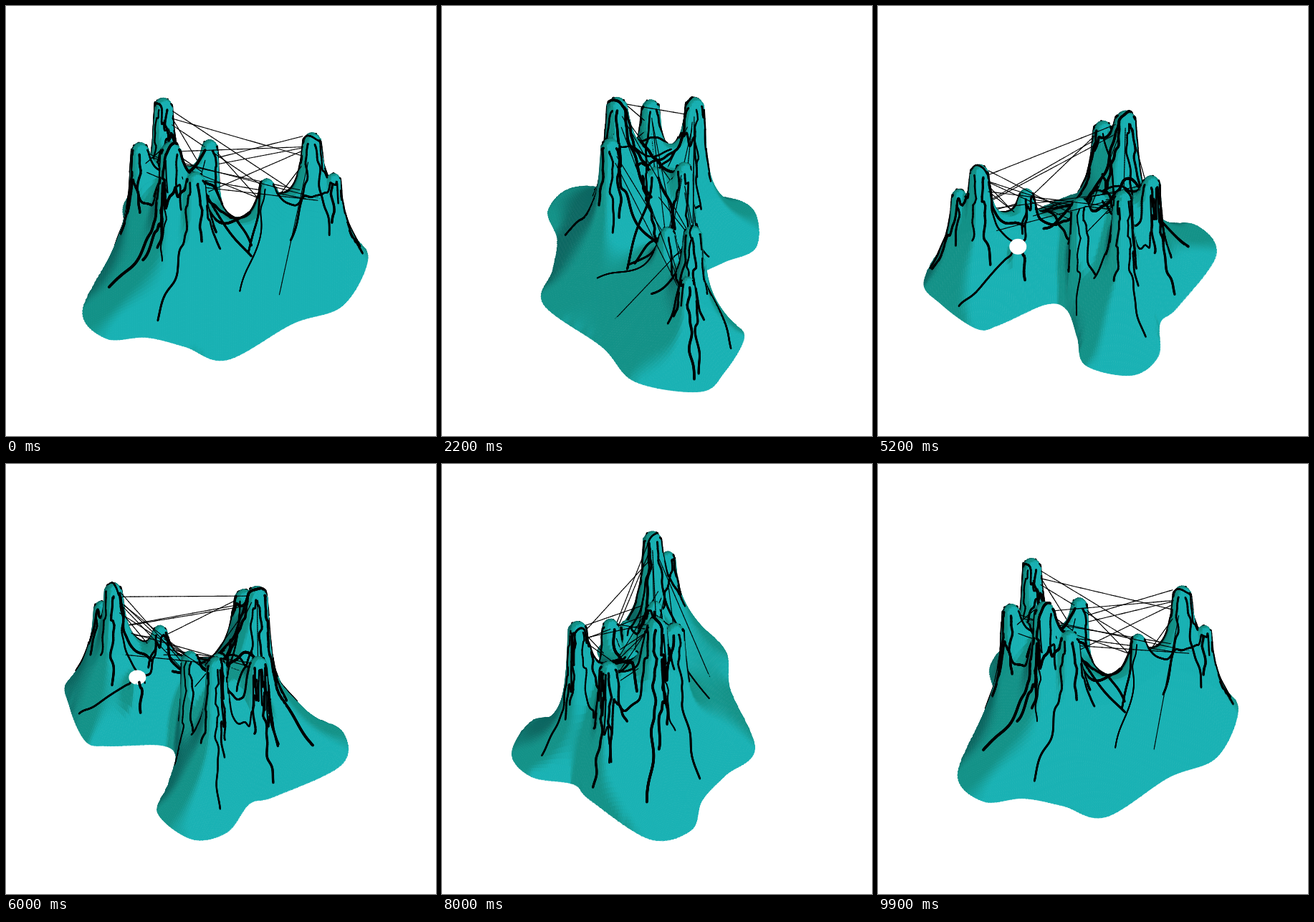
An HTML page with a canvas for the animation above (10000 ms loop, 600 by 600 pixels).

```html
<!DOCTYPE html>
<html lang="en">
<head>
<meta charset="utf-8">
<title>Rotating surface</title>
<style>
html, body { margin: 0; width: 100%; height: 100%; overflow: hidden; background: #fff; }
canvas { display: block; width: 600px; height: 600px; }
</style>
</head>
<body>
<canvas id="stage" width="600" height="600"></canvas>
<script>
const ctx = document.getElementById('stage').getContext('2d');
const CX = 286, CY = 378, TILT = 0.767, RISE = 0.643, STEP = 3;
const X0 = -192, Y0 = -186, NX = 142, NY = 118;
const TOP = 210, SKIRT = 0.52;

// Key points of the base outline, in plan
const rim = [
  [219,-34], [184,52], [114,85], [22,151], [-36,127], [-90,110], [-146,112], [-179,62],
  [-137,-39], [-117,-70], [-122,-130], [-90,-169], [-24,-159], [-6,-110], [15,-62],
  [45,-56], [105,-101], [135,-112], [190,-74]
];
// Summits: x, y, height
const peaks = [
  [-67,-80,184], [-99,-24,165], [-56,32,208], [-2,-53,147], [-22,48,179],
  [78,-14,123], [141,-38,168], [171,-25,122], [-23,-16,130], [84,-58,82]
];
const hole = [84, -59, 79];
const radius = h => 6.5 + h / 25;

let seed = 11;
function random() {
  seed = (seed * 16807) % 2147483647;
  return seed / 2147483647;
}

function smoothLoop(p, n) {
  const out = [];
  for (let i = 0; i < p.length; i++) {
    const [a, b, c, d] = [-1, 0, 1, 2].map(k => p[(i + k + p.length) % p.length]);
    for (let s = 0; s < n; s++) {
      const t = s / n;
      out.push([0, 1].map(k => b[k] + 0.5 * t * (c[k] - a[k] +
        t * (2 * a[k] - 5 * b[k] + 4 * c[k] - d[k] + t * (3 * (b[k] - c[k]) + d[k] - a[k])))));
    }
  }
  return out;
}

const edge = smoothLoop(rim, 14);
const area = new Path2D();
edge.forEach(([x, y]) => area.lineTo(x, y));
area.closePath();

// Gentle skirt below, steep columns above
const lift = u => TOP * (SKIRT * u + (1 - SKIRT) * u ** 8);
function unlift(h) {
  let a = 0, b = 1;
  for (let n = 0; n < 24; n++) {
    const m = (a + b) / 2;
    if (lift(m) < h) a = m; else b = m;
  }
  return a;
}

// Membrane stretched from the rim over the peaks
const inside = [], field = new Float64Array(NX * NY), free = [];
for (let k = 0; k < field.length; k++) {
  const x = X0 + (k % NX) * STEP, y = Y0 + Math.floor(k / NX) * STEP;
  inside[k] = ctx.isPointInPath(area, x, y);
  if (!inside[k]) continue;
  let h = 0;
  for (const [px, py, ph] of peaks) {
    const d = Math.hypot(x - px, y - py) / radius(ph);
    if (d <= 1) h = Math.max(h, ph - 9 * d ** 3);
  }
  if (h) field[k] = unlift(h);
  else free.push(k);
}
for (let n = 0; n < 350; n++) for (const k of free) {
  const mean = (field[k - 1] + field[k + 1] + field[k - NX] + field[k + NX]) / 4;
  field[k] += 1.85 * (mean - field[k]);
}
const nodes = Array.from(field, (u, k) => {
  let x = X0 + (k % NX) * STEP, y = Y0 + Math.floor(k / NX) * STEP;
  field[k] = lift(Math.max(0, u));
  if (!inside[k]) {
    let best = 1e9, near;
    for (const e of edge) {
      const d = (e[0] - x) ** 2 + (e[1] - y) ** 2;
      if (d < best) { best = d; near = e; }
    }
    [x, y] = near;
  }
  return [x, y, field[k]];
});

function heightAt(x, y) {
  const u = (x - X0) / STEP, v = (y - Y0) / STEP;
  const i = Math.floor(u), j = Math.floor(v), a = u - i, b = v - j, k = j * NX + i;
  return (field[k] * (1 - a) + field[k + 1] * a) * (1 - b) +
    (field[k + NX] * (1 - a) + field[k + NX + 1] * a) * b;
}

// Quads with averaged normals
const cells = new Map();
for (let j = 0; j < NY - 1; j++) for (let i = 0; i < NX - 1; i++) {
  const k = j * NX + i, q = [k, k + 1, k + NX + 1, k + NX];
  if (!q.some(c => inside[c])) continue;
  const [a, b, c, d] = q.map(n => nodes[n]);
  const e = [c[0] - a[0], c[1] - a[1], (c[2] - a[2]) / RISE];
  const f = [d[0] - b[0], d[1] - b[1], (d[2] - b[2]) / RISE];
  cells.set(k, { q, raw: [e[1] * f[2] - e[2] * f[1], e[2] * f[0] - e[0] * f[2], e[0] * f[1] - e[1] * f[0]] });
}
for (const [k, cell] of cells) {
  const n = [0, 0, 0];
  for (const dy of [-NX, 0, NX]) for (const dx of [-1, 0, 1]) {
    const c = cells.get(k + dx + dy);
    if (c) c.raw.forEach((v, m) => n[m] += v);
  }
  const len = Math.hypot(...n) || 1;
  cell.normal = n.map(v => v / len);
}

// Short black pieces: [start, end, width]
const pieces = [];

// Winding trails run down from each summit; the first one goes furthest
for (const [px, py, ph] of peaks) {
  const total = Math.round(ph / 30);
  const first = Math.atan2(py, px);
  for (let i = 0; i < total; i++) {
    const a = first + (i + 0.4 * random()) * 2 * Math.PI / total;
    const c = Math.cos(a), s = Math.sin(a), phase = 6 * random();
    const floor = ph * (i ? 0.25 + 0.4 * random() : 0.1), width = 1.8 + 1.9 * random();
    let last;
    for (let d = radius(ph) * 0.8; d < 100; d += 0.5) {
      const h = heightAt(px + c * d, py + s * d);
      const w = 2 * Math.sin(h * 0.12 + phase) + Math.sin(h * 0.29 + d * 0.2 + phase);
      const x = px + c * d - s * w, y = py + s * d + c * w;
      const pt = [x, y, heightAt(x, y) + 0.5];
      if (last) pieces.push([last, pt, width]);
      last = pt;
      if (h < floor) break;
    }
  }
}

// Straight wires between the columns
function wire(a, b, dropA, dropB) {
  const len = Math.hypot(b[0] - a[0], b[1] - a[1]);
  const ta = radius(a[2]) / len, tb = 1 - radius(b[2]) / len;
  const at = t => {
    const u = ta + (tb - ta) * t;
    return [a[0] + (b[0] - a[0]) * u, a[1] + (b[1] - a[1]) * u,
      (a[2] - dropA) * (1 - t) + (b[2] - dropB) * t];
  };
  for (let i = 0; i < 30; i++) pieces.push([at(i / 30), at((i + 1) / 30), 1.1]);
}
for (let i = 0; i < 7; i++) for (let j = i + 1; j < 9; j++) {
  if ((i + j) % 3 !== 1) wire(peaks[i], peaks[j], 8 + 25 * random(), 5 + 35 * random());
}
wire(peaks[0], peaks[6], 12, 88);
wire(peaks[3], peaks[6], 20, 2);
wire(peaks[6], [92, 70, 22], 28, 0);

const ramp = (a, b, t) => {
  const u = Math.min(1, Math.max(0, (t - a) / (b - a)));
  return u * u * (3 - 2 * u);
};
const mix = (a, b, t) => a.map((v, i) => v + (b[i] - v) * t);
function tone(t) {
  const low = mix([13, 104, 98], [20, 146, 136], ramp(-0.3, 0.15, t));
  return 'rgb(' + mix(low, [26, 178, 180], ramp(0.42, 0.68, t)).map(Math.round).join(',') + ')';
}

function draw(frame) {
  const a = frame * Math.PI / 50, c = Math.cos(a), s = Math.sin(a);
  const project = ([x, y, h]) => {
    const depth = x * s + y * c;
    return [CX + x * c - y * s, CY + TILT * depth - h, depth];
  };
  const pts = nodes.map(project), items = [];
  for (const { q, normal: [nx, ny, nz] } of cells.values()) {
    const p = q.map(k => pts[k]);
    const light = 0.45 * (nx * c - ny * s) + 0.77 * (nx * s + ny * c) + 0.45 * nz;
    items.push({ key: (p[0][2] + p[1][2] + p[2][2] + p[3][2]) / 4, p, color: tone(light) });
  }
  for (const [from, to, width] of pieces) {
    const p = [project(from), project(to)];
    items.push({ key: (p[0][2] + p[1][2]) / 2 + 4, p, width });
  }
  // The opening shows only from behind
  if (c < -0.35) {
    const p = project(hole);
    items.push({ key: p[2] + 9, p: [p], opening: 7 - 4 * c });
  }
  items.sort((m, n) => m.key - n.key);

  ctx.fillStyle = '#fff';
  ctx.fillRect(0, 0, 600, 600);
  ctx.lineCap = ctx.lineJoin = 'round';
  for (const { p, color, width, opening } of items) {
    ctx.beginPath();
    if (opening) {
      ctx.ellipse(p[0][0], p[0][1], 12, opening, 0, 0, 7);
      ctx.fillStyle = '#fff';
      ctx.fill();
      continue;
    }
    p.forEach(v => ctx.lineTo(v[0], v[1]));
    if (color) {
      ctx.closePath();
      ctx.fillStyle = color;
      ctx.fill();
    }
    ctx.strokeStyle = color || '#000';
    ctx.lineWidth = width || 0.8;
    ctx.stroke();
  }
}

const start = performance.now();
let shown = -1;
function tick() {
  const frame = Math.floor((performance.now() - start) / 100) % 100;
  if (frame !== shown) draw(shown = frame);
  requestAnimationFrame(tick);
}
tick();
</script>
</body>
</html>
```
